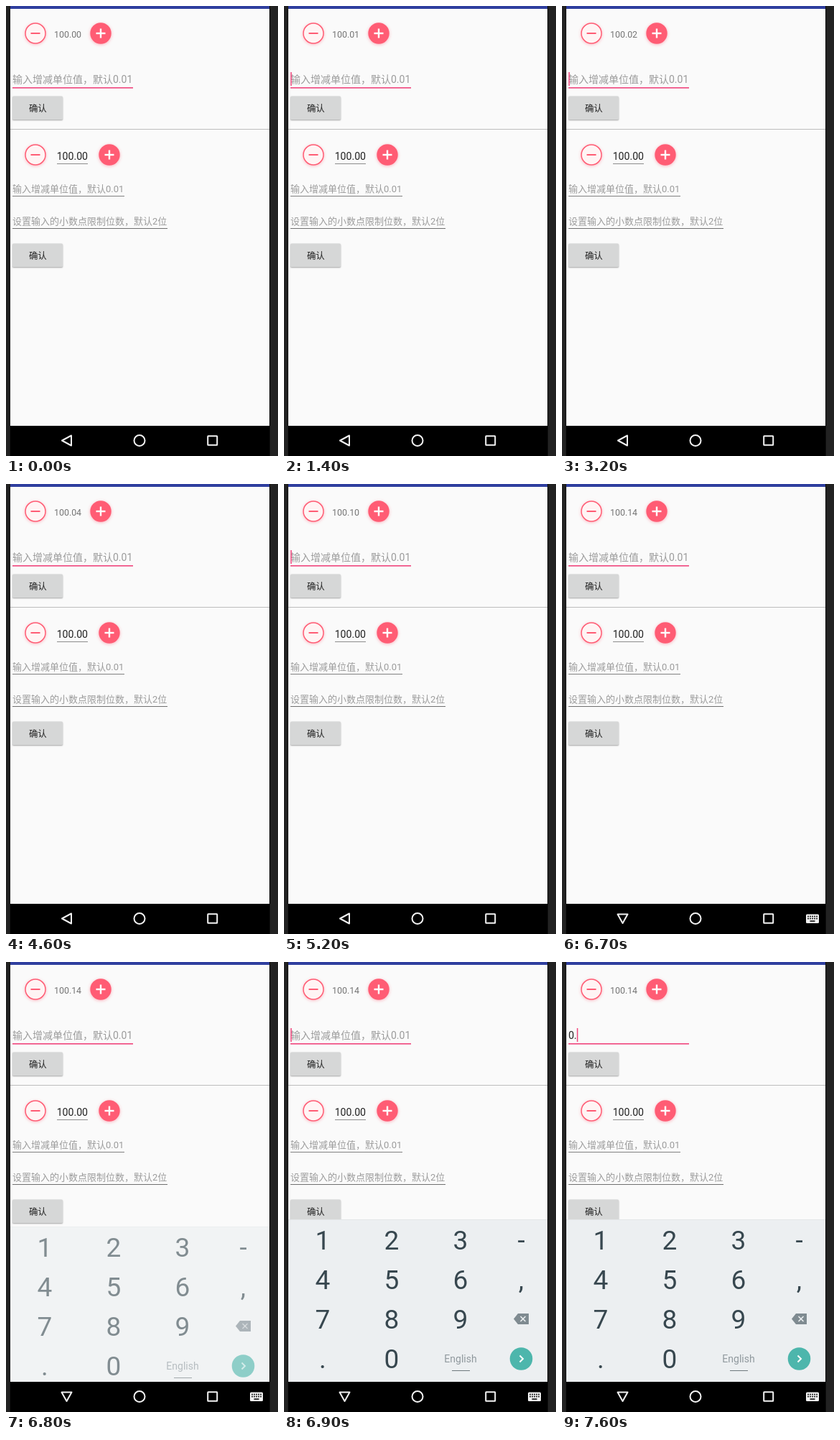
Recreate the animation shown at these times as an HTML page with a canvas. Size 379x626 px, loop 8 s.

```html
<!DOCTYPE html>
<html lang="zh">
<head>
<meta charset="utf-8">
<title>Number stepper</title>
<style>
html, body { margin: 0; width: 100%; height: 100%; overflow: hidden; background: #222; }
canvas { display: block; width: 379px; height: 626px; }
</style>
</head>
<body>
<canvas id="stage"></canvas>
<script>
const W = 379, H = 626, LOOP = 8000;
const PINK = '#ff5c74', ACCENT = '#f0457c', HINT = '#9b9b9b', INK = '#37474f';
const FONT = 'Roboto, "Noto Sans CJK SC", "Noto Sans CJK", sans-serif';

// Times at which the caret toggles, starting hidden
const BLINKS = [500, 900, 1400, 1900, 2300, 2800, 3200, 3700, 4200,
  4600, 5100, 5500, 6000, 6400, 6900, 7400, 7500];
// Single taps on plus; holding it adds one step per 100 ms
const TAPS = [1000, 2900, 3700, 4400];
const HOLD_START = 4700, HOLD_STEPS = 10;

const canvas = document.getElementById('stage');
const scale = window.devicePixelRatio || 1;
canvas.width = W * scale;
canvas.height = H * scale;
const c = canvas.getContext('2d');

function rect(x, y, w, h, color) {
  c.fillStyle = color;
  c.fillRect(x, y, w, h);
}

function text(str, x, y, size, color, align = 'left') {
  c.font = `${size}px ${FONT}`;
  c.textAlign = align;
  c.fillStyle = color;
  c.fillText(str, x, y);
}

function trace(points, closed) {
  c.beginPath();
  points.forEach(([x, y]) => c.lineTo(x, y));
  if (closed) c.closePath();
}

function stroke(color, width) {
  c.strokeStyle = color;
  c.lineWidth = width;
  c.stroke();
}

function disc(x, y, r) {
  c.beginPath();
  c.arc(x, y, r, 0, Math.PI * 2);
}

function box(x, y, w, h, r) {
  c.beginPath();
  c.roundRect(x, y, w, h, r);
}

function shadowFill(color, shadow, blur, dy) {
  c.save();
  c.shadowColor = shadow;
  c.shadowBlur = blur * scale;
  c.shadowOffsetY = dy * scale;
  c.fillStyle = color;
  c.fill();
  c.restore();
}

function minus(x, y) {
  disc(x, y, 14.5);
  shadowFill('#fff4f4', 'rgba(255,92,116,.45)', 4, 1);
  disc(x, y, 14);
  stroke(PINK, 1.5);
  rect(x - 6.5, y - 1, 13, 2, PINK);
}

function plus(x, y) {
  disc(x, y, 14.7);
  shadowFill(PINK, 'rgba(255,92,116,.45)', 4, 1);
  rect(x - 6.5, y - 1.2, 13, 2.4, '#fff');
  rect(x - 1.2, y - 6.5, 2.4, 13, '#fff');
}

function confirmButton(y) {
  box(9, y, 70, 32.5, 1.5);
  shadowFill('#d6d7d7', 'rgba(0,0,0,.35)', 2, 1);
  text('确认', 44.3, y + 21, 12.4, '#222', 'center');
}

function counter(t) {
  const taps = TAPS.filter(at => t >= at).length;
  const held = Math.floor((t - HOLD_START) / 100) + 1;
  const steps = taps + Math.min(HOLD_STEPS, Math.max(0, held));
  return (100 + steps / 100).toFixed(2);
}

function page(t) {
  rect(6, 0, 361, 584, '#fafafa');
  rect(6, 0, 361, 4, '#303f9f');

  minus(41, 38);
  text(counter(t), 67, 44, 12.4, '#757575');
  plus(132, 38);

  const typed = t < 7500 ? '' : t < 7600 ? '0' : '0.';
  if (typed) text(typed, 9, 107, 14, '#222');
  else text('输入增减单位值，默认0.01', 9, 107, 14, HINT);
  rect(9, 113, 168, 1.6, ACCENT);
  if (BLINKS.filter(at => t >= at).length % 2) {
    c.font = `14px ${FONT}`;
    rect(9.2 + c.measureText(typed).width, 92, 1.5, 19, ACCENT);
  }
  confirmButton(125.5);
  rect(6, 171, 361, 1, '#bdbdbd');

  minus(41, 207);
  text('100.00', 70.7, 213.5, 14.1, '#222');
  rect(71, 219, 43, 1, '#8c8c8c');
  plus(144, 207);

  text('输入增减单位值，默认0.01', 9, 258.5, 13, HINT);
  rect(9, 264, 156, 1, '#808080');
  text('设置输入的小数点限制位数，默认2位', 9, 303.5, 13, HINT);
  rect(9, 309, 216, 1, '#707070');
  confirmButton(330.5);
}

function keypad(alpha, dy) {
  c.save();
  c.beginPath();
  c.rect(6, 0, 361, 584);
  c.clip();
  c.globalAlpha = alpha;
  c.translate(0, dy);
  rect(6, 358, 361, 1, '#e3e6e8');
  rect(6, 359, 361, 225, '#eceff1');

  ['123-', '456,', '789', '.0'].forEach((row, j) =>
    [...row].forEach((key, i) =>
      text(key, [54, 150, 246, 330.5][i], 399.5 + j * 55.3, 37, INK, 'center')));

  text('English', 246, 556.5, 14, '#90999e', 'center');
  rect(234, 568, 25, 1, '#6f797e');

  trace([[320, 496.5], [326, 489], [341, 489], [341, 504], [326, 504]], true);
  c.fillStyle = '#7f8b91';
  c.fill();
  for (const s of [-1, 1]) {
    trace([[329.5, 496.5 - 3.5 * s], [336.5, 496.5 + 3.5 * s]]);
    stroke('#eceff1', 1.6);
  }

  disc(330.5, 552, 15.8);
  c.fillStyle = '#4db6ac';
  c.fill();
  trace([[328.5, 547.5], [333, 552], [328.5, 556.5]]);
  stroke('#fff', 2);
  c.restore();
}

function navBar(open) {
  const white = '#f2f2f2';
  rect(6, 584, 361, 42, '#000');
  c.lineJoin = 'round';
  trace(open ? [[77.5, 598.5], [91.5, 598.5], [84.5, 611]]
             : [[78, 604.5], [91, 597.5], [91, 611.5]], true);
  stroke(white, 2);
  disc(186, 604.5, 7.5);
  stroke(white, 2);
  box(281.2, 598.2, 13, 12.6, 0.5);
  stroke(white, 2);
  c.lineJoin = 'miter';
  if (!open) return;

  box(340, 598.5, 18, 12.5, 1.5);
  c.fillStyle = white;
  c.fill();
  for (let row = 0; row < 2; row++)
    for (let i = 0; i < 5; i++)
      rect(342.2 + i * 3, 600.7 + row * 3, 1.7, 1.7, '#000');
  rect(345.5, 607.3, 7, 1.5, '#000');
}

function draw(t) {
  c.setTransform(scale, 0, 0, scale, 0, 0);
  rect(0, 0, W, H, '#222');
  rect(5, 0, 1, H, '#181818');
  rect(367, 0, 1, H, '#0c0c0c');
  page(t);
  if (t >= 6900) keypad(1, 0);
  else if (t >= 6800) keypad(0.6, 10);
  navBar(t >= 6700);
}

const start = performance.now();
function tick() {
  draw((performance.now() - start) % LOOP);
  requestAnimationFrame(tick);
}
tick();
</script>
</body>
</html>
```
